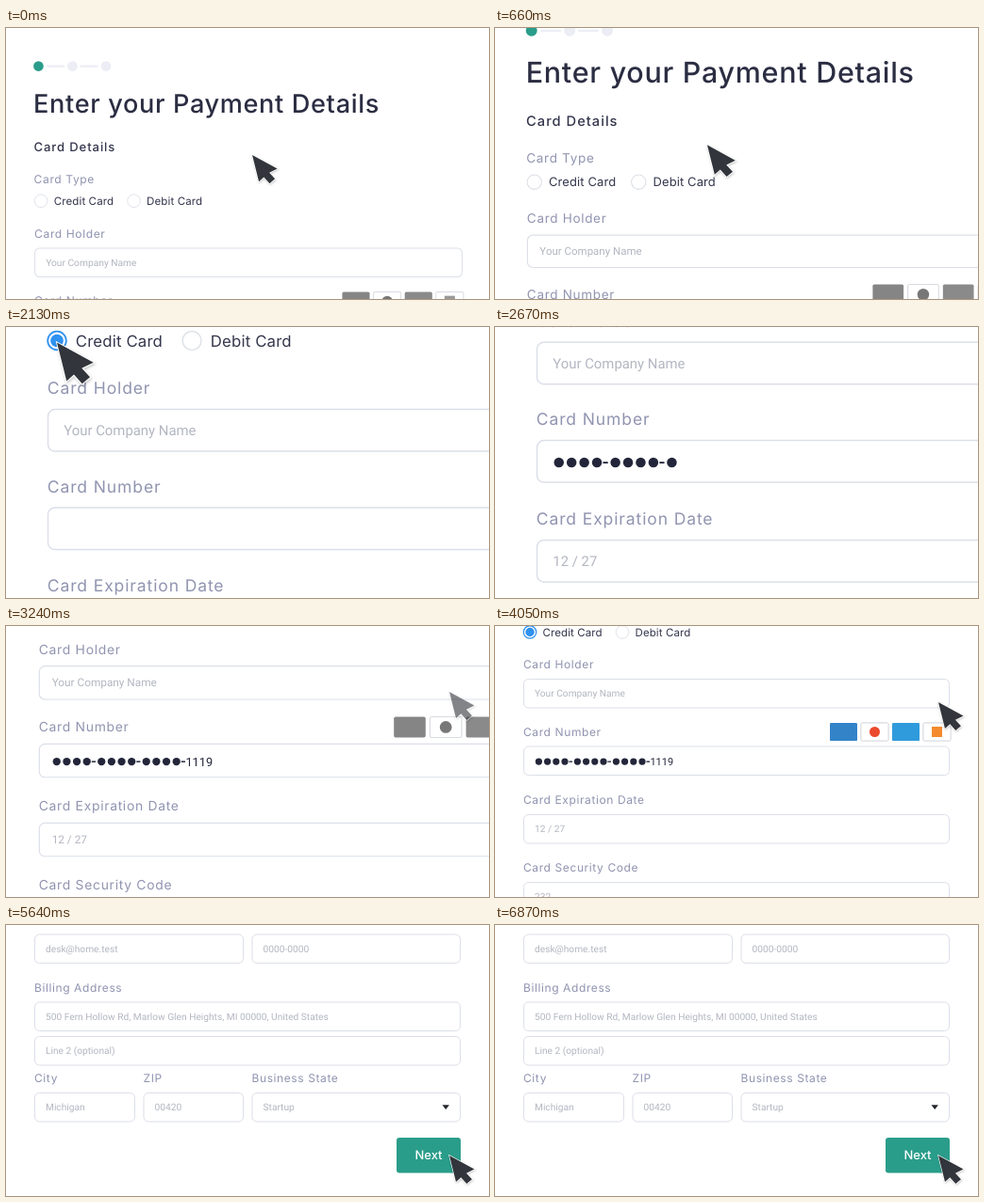
Recreate the animation shown at these times as an HTML page. Size 512 by 288 pixels, loop 6.9 s.

```html
<!DOCTYPE html>
<html lang="en">
<head>
<meta charset="utf-8">
<title>Payment form</title>
<style>
  html, body { margin: 0; width: 100%; height: 100%; overflow: hidden; background: #fff; }
  svg { display: block; width: 100vw; height: 100vh; text-rendering: geometricPrecision; }
  text { font-family: Inter, "Open Sans", sans-serif; white-space: pre; }
  .title { font-size: 27px; font-weight: 500; letter-spacing: .65px; fill: #2b2d42; }
  .section { font-size: 13px; font-weight: 500; letter-spacing: .9px; fill: #34364c; }
  .label { font-size: 12px; letter-spacing: .6px; fill: #9094b0; }
  .choice { font-size: 11.5px; letter-spacing: .1px; fill: #34364c; }
  .hint { font-family: Roboto, "Liberation Sans", sans-serif; font-size: 10.2px; fill: #b3b6c1; }
  .digits { font-family: Roboto, "Liberation Sans", sans-serif; font-size: 11px; fill: #23263a; }
  .next { font-size: 13px; font-weight: 500; fill: #fff; text-anchor: middle; }
  .field { fill: #fff; stroke: #dcdfe9; }
</style>
</head>
<body>
<svg id="stage" viewBox="0 0 512 288">
  <defs>
    <filter id="soft" x="-30%" y="-30%" width="170%" height="170%">
      <feDropShadow dx="0.5" dy="1" stdDeviation="1" flood-color="#000" flood-opacity=".25"/>
    </filter>
  </defs>
  <g id="page"></g>
  <g id="pointer" filter="url(#soft)">
    <path d="M0 0 7 28 12.3 23.3 18.3 30 24 25.2 18 18.7 26.5 14.5Z"
          fill="#32363b" stroke="#fff" stroke-width="1.2" paint-order="stroke"/>
  </g>
</svg>
<script>
const LOOP = 6900;
const page = document.getElementById('page');
const pointer = document.getElementById('pointer');

function add(parent, tag, attrs, content) {
  const node = document.createElementNS('http://www.w3.org/2000/svg', tag);
  for (const key in attrs) node.setAttribute(key, attrs[key]);
  if (content) node.textContent = content;
  parent.appendChild(node);
  return node;
}
const text = (kind, x, y, content, parent = page) => add(parent, 'text', { class: kind, x, y }, content);
const rect = (parent, x, y, width, height, rx, fill) =>
  add(parent, 'rect', { x, y, width, height, rx, fill });
const circle = (parent, cx, cy, r, fill) => add(parent, 'circle', { cx, cy, r, fill });

function field(x, right, y, hint) {
  add(page, 'rect', { class: 'field', x: x + .5, y: y + .5, width: right - x - 1, height: 30.5, rx: 5 });
  if (hint) text('hint', x + 12, y + 19.3, hint);
}
function labelled(x, right, y, label, hint) {
  text('label', x, y + 4.3, label);
  field(x, right, y + 15, hint);
}

// Header
circle(page, 34.3, 40.4, 5.3, '#2a9d8a');
for (const x of [70.2, 105.6]) {
  circle(page, x, 40.4, 5.3, '#ecedf5');
  rect(page, x - 27.6, 39.3, 19.5, 2.2, 1, '#ecedf5');
}
text('title', 29, 89.6, 'Enter your Payment Details');
text('section', 29.3, 130.5, 'Card Details');
text('label', 29.5, 164.3, 'Card Type');

// Card type
for (const [x, name] of [[37, 'Credit Card'], [135, 'Debit Card']]) {
  add(page, 'circle', { cx: x, cy: 183, r: 6.8, fill: '#fff', stroke: '#dcdfe6', 'stroke-width': .9 });
  text('choice', x + 13.5, 187.2, name);
}
const chosen = add(page, 'g', {});
add(chosen, 'circle', { cx: 37, cy: 183, r: 6.7, fill: '#fff', stroke: '#2f92f0', 'stroke-width': 1.2 });
circle(chosen, 37, 183, 4.7, '#2f92f0');

// Form rows
labelled(30, 482, 217.5, 'Card Holder', 'Your Company Name');
labelled(30, 482, 289, 'Card Number');
labelled(30, 482, 361.5, 'Card Expiration Date', '12 / 27');
labelled(30, 482, 433.5, 'Card Security Code', '232');
labelled(30, 252, 505.5, 'Email Address', 'desk@home.test');
labelled(260.5, 482, 505.5, 'Phone Number', '0000-0000');
labelled(30, 482, 577.5, 'Billing Address',
  '500 Fern Hollow Rd, Marlow Glen Heights, MI 00000, United States');
field(30, 482, 629, 'Line 2 (optional)');
labelled(30, 137, 674, 'City', 'Michigan');
labelled(145.5, 252, 674, 'ZIP', '00420');
labelled(260.5, 482, 674, 'Business State', 'Startup');
add(page, 'path', { d: 'M462.5 702.3h7.4l-3.7 4.6z', fill: '#22242c' });
rect(page, 414, 737, 68, 37.5, 3, '#2a9d8a');
text('next', 448, 760.4, 'Next');

// Accepted cards, plain stand-ins
function cards(blue, red, sky, orange) {
  const group = add(page, 'g', {});
  [blue, '#fff', sky, '#fff'].forEach((fill, i) => {
    const chip = rect(group, 355 + 33 * i, 279.5, 29, 19, 1.5, fill);
    if (i % 2) chip.setAttribute('stroke', '#d9dbe0');
  });
  circle(group, 402.5, 289, 5.5, red);
  rect(group, 463, 283.5, 11, 11, 0, orange);
  return group;
}
cards('#858585', '#777', '#8a8a8a', '#999');
const colourCards = cards('#3383c9', '#eb4a2c', '#2f9bdc', '#f58a2c');

// Masked card number, one node per character
const typed = [];
for (let group = 0; group < 3; group++) {
  const x = 46.4 + 41 * group;
  for (let i = 0; i < 4; i++) typed.push(circle(page, x + 9.2 * i, 320.6, 3.6, '#23263a'));
  typed.push(rect(page, x + 32, 320, 3.6, 1.3, 0, '#23263a'));
}
[...'1119'].forEach((digit, i) => typed.push(text('digits', 164.4 + 6.18 * i, 324.5, digit)));

const clamp = v => Math.min(1, Math.max(0, v));
const span = (t, from, to) => clamp((t - from) / (to - from));
const inOut = p => p < .5 ? 4 * p ** 3 : 1 - 4 * (1 - p) ** 3;
const ease = (t, from, to) => inOut(span(t, from, to));
const mix = (a, b, p) => a + (b - a) * p;

function camera(t) {
  const zoomIn = ease(t, 200, 1330);
  const zoomOut = ease(t, 2850, 3550);
  let y = mix(0, -157.2, zoomIn);
  y = mix(y, -324, ease(t, 1800, 2430));
  y = mix(y, -176.5, zoomOut);
  y = mix(y, -511, ease(t, 4080, 4700));
  return { scale: mix(mix(1.004, 1.46, zoomIn), 1, zoomOut), y };
}

function pointerPose(t, view) {
  if (t < 2850) {
    const p = ease(t, 200, 1330);
    return {
      x: mix(260, 37, p) * view.scale,
      y: mix(134.5, 184.4, p) * view.scale + view.y,
      scale: view.scale, opacity: 1
    };
  }
  const y = mix(64.5, 81, ease(t, 3000, 3550));
  return {
    x: 470, y: mix(y, 245, ease(t, 4200, 4855)),
    scale: 1, opacity: span(t, 3120, 3320)
  };
}

function draw(t) {
  const view = camera(t);
  page.setAttribute('transform', `translate(0 ${view.y}) scale(${view.scale})`);
  const pose = pointerPose(t, view);
  pointer.setAttribute('transform', `translate(${pose.x} ${pose.y}) scale(${pose.scale})`);
  pointer.setAttribute('opacity', pose.opacity);
  chosen.setAttribute('opacity', span(t, 1680, 1740));
  colourCards.setAttribute('opacity', span(t, 3550, 3800));
  const count = Math.floor(span(t, 2400, 2830) * typed.length);
  typed.forEach((node, i) => node.setAttribute('visibility', i < count ? 'visible' : 'hidden'));
}

const start = performance.now();
function tick() {
  draw((performance.now() - start) % LOOP);
  requestAnimationFrame(tick);
}
tick();
</script>
</body>
</html>
```
